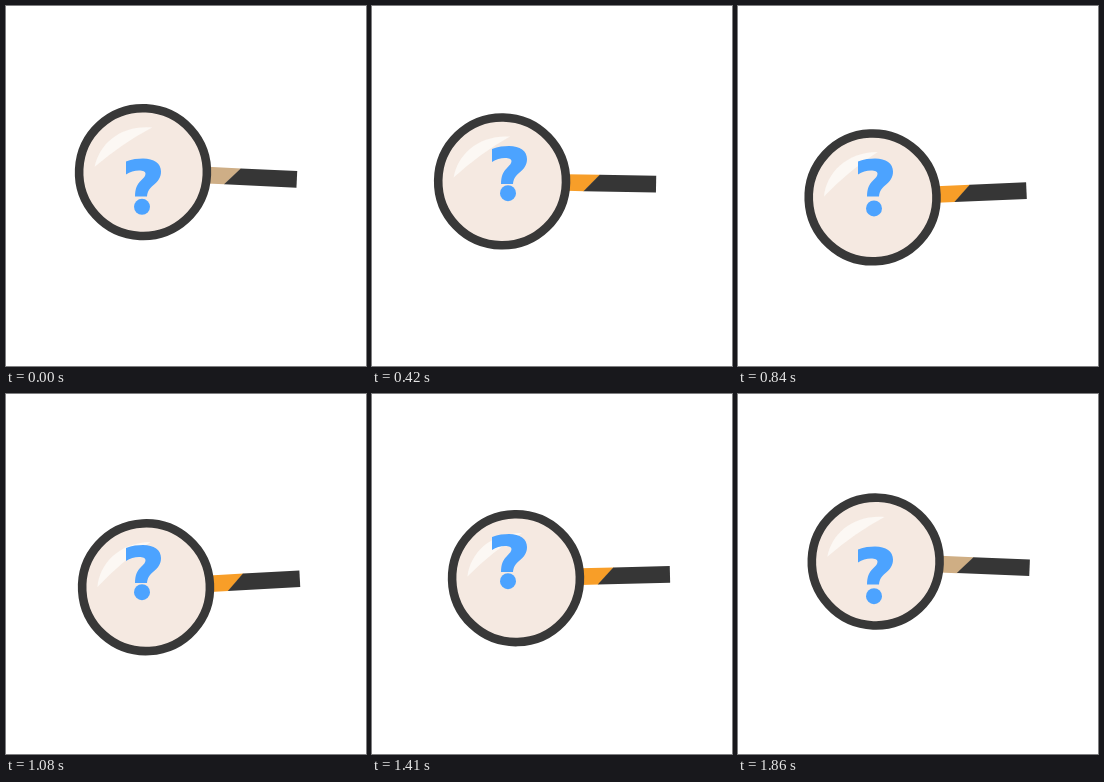
Recreate the animation shown at these times as an HTML page. Size 360 by 360 pixels, loop 1890 ms.

```html
<!DOCTYPE html>
<html lang="en">
<head>
<meta charset="utf-8">
<title>Magnifying glass</title>
<style>
  html, body { margin: 0; width: 100%; height: 100%; overflow: hidden; background: #fff; }
  svg { display: block; width: 100%; height: 100%; }
</style>
</head>
<body>
<svg viewBox="0 0 360 360">
  <g id="glass">
    <path id="collar" d="M64-8.3H98L82 8.3H64Z"/>
    <path d="M97.500-8.3H154V8.3H81.500Z" fill="#363636"/>
    <circle r="63.9" fill="#f5e9e1" stroke="#383838" stroke-width="8.6"/>
    <path d="M-48.500-3C-45-26-25-46 7-45Q-22-28-48.500-3Z" fill="#fcf8f4"/>
  </g>
  <g fill="#4ca3ff">
    <path id="hook" d="M120 3C126 .6 132 0 137 0C148 0 155 5 155 13C155 19 152 23 147 27C143 30.500 141.500 33 141 38H129C129 30 131 26 135 22C138 19 139.500 17.500 139.500 15.200C139.500 13 137 12 133 12C128.500 12 124 13.500 120 16Z"/>
    <circle id="dot" cx="136" r="8"/>
  </g>
</svg>
<script>
const LOOP = 1890, STEP = 30, BOB = 1980, HOP = BOB / 2;
const TAN = [206, 174, 134], ORANGE = [248, 158, 40];

const el = id => document.getElementById(id);
const turn = (t, period, lag = 0) => 2 * Math.PI * (t / period - lag);

// One smooth jump per period, then a rest on the ground
function jump(t) {
  const u = (t % HOP - 30) / 600;
  return u > 0 && u < 1 ? Math.sin(Math.PI * u) ** 2 : 0;
}

function collarAt(t) {
  const fade = Math.cos(Math.PI * t / LOOP) ** 16;
  return `rgb(${ORANGE.map((v, i) => Math.round(v + (TAN[i] - v) * fade))})`;
}

function draw(time) {
  const t = Math.floor((time % LOOP) / STEP) * STEP;
  const x = 137 - 7 * Math.sin(turn(t, LOOP));
  const y = 179.8 - 13.7 * Math.cos(turn(t, BOB, 0.014));
  const tilt = 2.95 * Math.cos(turn(t, BOB, 0.03)) - 0.2;
  const top = 152.6 - 16 * jump(t);
  const gap = 48.2 - 2 * Math.sin(turn(t, HOP));

  el("glass").setAttribute("transform", `translate(${x} ${y}) rotate(${tilt})`);
  el("collar").setAttribute("fill", collarAt(t));
  el("hook").setAttribute("transform", `translate(0 ${top})`);
  el("dot").setAttribute("cy", top + gap);
}

const start = performance.now();
function tick() {
  draw(performance.now() - start);
  requestAnimationFrame(tick);
}
tick();
</script>
</body>
</html>
```
